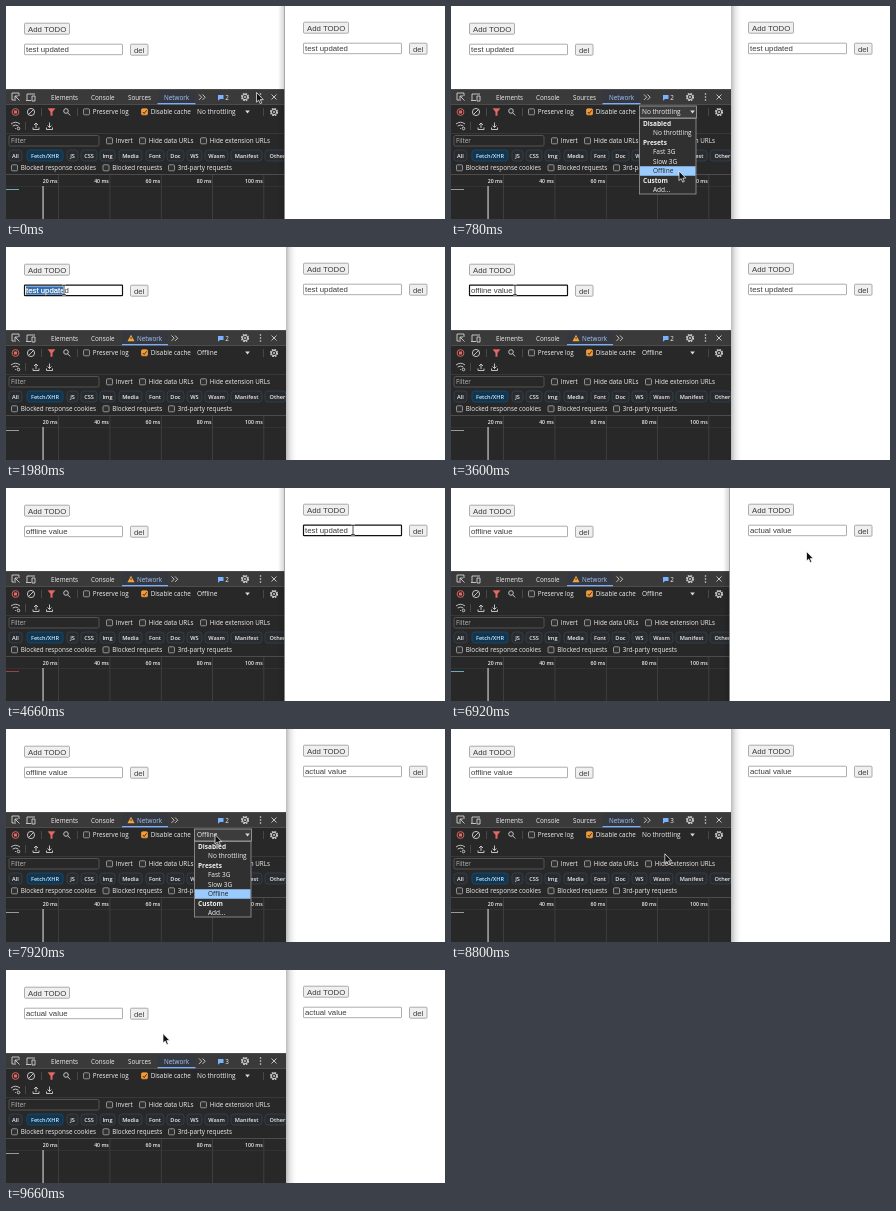
Write an HTML page that moves like this. It is 439 by 213 pixels and loops after 9.68 s.

```html
<!DOCTYPE html>
<html lang="en">
<head>
<meta charset="utf-8">
<title>Offline todo sync</title>
<style>
  html, body { margin: 0; width: 100%; height: 100%; overflow: hidden; background: #fff; }
  svg { display: block; width: 100vw; height: 100vh; }
  text { white-space: pre; }
  .page { font: 7.8px "Liberation Sans", Arial, sans-serif; fill: #3c3c3c; }
  .tools { font: 6.3px "Open Sans", "Noto Sans", sans-serif; fill: #f0f0f0; }
  .bold { font-weight: 700; }
  .chip { font-size: 5.6px; font-weight: 600; }
  .scale { font-size: 5.2px; font-weight: 600; text-anchor: end; }
</style>
</head>
<body>
<svg id="stage" viewBox="0 0 439 213">
  <defs>
    <linearGradient id="shadeRight"><stop stop-color="#bbb"/><stop offset=".3" stop-color="#e2e2e2"/><stop offset="1" stop-color="#fff" stop-opacity="0"/></linearGradient>
    <linearGradient id="shadeLeft"><stop stop-color="#000" stop-opacity="0"/><stop offset="1" stop-color="#000" stop-opacity=".16"/></linearGradient>
  </defs>
</svg>
<script>
const LOOP = 9680;
const stage = document.getElementById('stage');

function add(parent, tag, attrs = {}, content) {
  const node = document.createElementNS('http://www.w3.org/2000/svg', tag);
  for (const key in attrs) node.setAttribute(key, attrs[key]);
  if (content !== undefined) node.textContent = content;
  parent.append(node);
  return node;
}
const set = (node, attrs) => { for (const key in attrs) node.setAttribute(key, attrs[key]); };
const show = (node, on) => set(node, { visibility: on ? 'visible' : 'hidden' });
const group = (parent, cls = '') => add(parent, 'g', { class: cls });
const rect = (parent, x, y, width, height, fill, more) =>
  add(parent, 'rect', { x, y, width, height, fill, ...more });
const label = (parent, x, y, content, more) => add(parent, 'text', { x, y, ...more }, content);
const LINE = { fill: 'none', stroke: '#d2d2d2', 'stroke-width': .9 };
const path = (parent, d, more) => add(parent, 'path', { d, ...LINE, ...more });
const ring = (parent, cx, cy, r, more) => add(parent, 'circle', { cx, cy, r, ...LINE, ...more });

// Todo pages
const BORDER = { stroke: '#999', 'stroke-width': .8 };
function button(parent, x, y, width, content) {
  rect(parent, x + .5, y + .5, width - 1, 11, '#efefef', { rx: 1, ...BORDER });
  label(parent, x + 4, y + 8.8, content);
}

function todoPage(x, y, id) {
  const g = group(stage, 'page');
  button(g, x, y, 46, 'Add TODO');
  button(g, x + 106, y + 21, 18.5, 'del');
  const box = rect(g, x + .5, y + 21.5, 98, 10.5, '#fff', { rx: .6 });
  const mark = rect(g, x + 2, y + 22.7, 0, 8.3, '#2f70b8');
  const text = label(g, x + 2, y + 29.5, '');
  const clip = rect(add(g, 'clipPath', { id }), 0, y + 21, 0, 12);
  const marked = label(g, x + 2, y + 29.5, '', { fill: '#fff', stroke: '#fff', 'stroke-width': .25, 'clip-path': `url(#${id})` });
  const caret = rect(g, 0, y + 23, .7, 8, '#111');
  return {
    contains: (px, py) => px >= x && px < x + 99 && py > y + 20 && py < y + 33,
    update({ value, focused, from = 0, to = 0, blink }) {
      text.textContent = marked.textContent = value;
      set(box, focused ? { stroke: '#101010', 'stroke-width': 1.2 } : BORDER);
      set(mark, { x: from, width: to - from });
      set(clip, { x: from, width: to - from });
      show(caret, focused && from === to && blink);
      set(caret, { x: x + 2.3 + (value ? text.getComputedTextLength() : 0) });
    }
  };
}
const left = todoPage(18, 16.7, 'leftMarked');
const right = todoPage(297, 15.7, 'rightMarked');

// Developer tools
const tools = group(stage, 'tools');
rect(tools, 0, 83, 280, 130, '#282828');
rect(tools, 0, 83, 280, 15, '#3a3a3a');
const rule = (x, y, width, height, fill = '#555') => rect(tools, x, y, width, height, fill);
rule(0, 83, 280, .7);
rule(0, 98, 280, .8);
rule(0, 127, 280, .6, '#444');
rule(0, 168, 280, .8);

function gear(x, y) {
  ring(tools, x, y, 3.4, { 'stroke-width': 1.3, 'stroke-dasharray': '1.7 .97' });
  ring(tools, x, y, 2.7);
  ring(tools, x, y, .8);
}
function check(x, y, content, on) {
  rect(tools, x + .5, y - 3.2, 6, 6, on ? '#f29b38' : '#303030', { rx: 1, stroke: on ? '#f29b38' : '#aaa', 'stroke-width': .8 });
  if (on) path(tools, `M${x + 1.8} ${y}l1.4 1.5 2.4-3.2`, { stroke: '#222' });
  label(tools, x + 9.7, y + 2.2, content);
}
function activeTab(parent, x, width, textX) {
  rect(parent, x, 84, width, 14, '#35393f');
  label(parent, textX, 93.8, 'Network', { fill: '#a8c7fa' });
  rect(parent, x, 97, width, 1.3, '#7cacf8');
}
const more = (parent, x) => path(parent, `M${x} 88.5l2.7 2.7-2.7 2.7M${x + 3.5} 88.5l2.7 2.7-2.7 2.7`);

path(tools, 'M10 94H6V87h7v3M9 90l4.5 4.5M9 93v-3h3');
path(tools, 'M21 94v-6h8M20 94.5h5M26 90h3v5h-3z');
label(tools, 45, 93.8, 'Elements');
label(tools, 85, 93.8, 'Console');
const onlineTabs = group(tools), offlineTabs = group(tools);
label(onlineTabs, 122, 93.8, 'Sources');
activeTab(onlineTabs, 151.5, 38, 158);
more(onlineTabs, 193);
activeTab(offlineTabs, 116, 46, 131);
path(offlineTabs, 'M125 87.8l3.5 6.5h-7z', { fill: '#f6a63a', stroke: 'none' });
rect(offlineTabs, 124.6, 90, .9, 2.2, '#333');
more(offlineTabs, 165.5);
path(tools, 'M212 89h5.5v4h-3.5l-2 1.8z', { fill: '#79b3ff', stroke: 'none' });
const badge = label(tools, 219.3, 93.8, '2');
gear(239, 91);
for (const y of [88, 91, 94]) ring(tools, 254.5, y, .8, { fill: '#ddd', stroke: 'none' });
path(tools, 'M265.5 88.5l5 5m0-5l-5 5');

ring(tools, 9.5, 106, 3.4, { stroke: '#e46962' });
rect(tools, 8, 104.5, 3, 3, '#e46962');
ring(tools, 25, 106, 3.6);
path(tools, 'M22.5 108.5l5-5');
path(tools, 'M42 102.5h7l-2.7 3.5v3.5h-1.6V106z', { fill: '#e46962', stroke: '#e46962', 'stroke-width': .4 });
ring(tools, 60, 105, 2.3);
path(tools, 'M61.7 106.8l2.5 2.6');
for (const x of [35, 71, 257]) rule(x, 102, .7, 8);
check(77, 106, 'Preserve log');
check(135, 106, 'Disable cache', true);
const selectBox = rect(tools, 188.5, 100, 57, 12, '#3c3c3c', { stroke: '#aaa', 'stroke-width': .8 });
const choice = label(tools, 191, 108.2, '', { 'font-size': 6.5 });
path(tools, 'M239.2 104.5h4.6l-2.3 3z', { fill: '#ddd', stroke: 'none' });
gear(268, 106);

path(tools, 'M5 118q4.5-3.5 9 0M6.7 120q2.8-2 5.6 0M9.5 122v.8');
ring(tools, 12.5, 122.5, 1.3);
rule(19, 116, .7, 8);
path(tools, 'M30 122v-5m-2 2l2-2 2 2M27 121.5v2h6v-2');
path(tools, 'M43.5 116.5v5m-2-2l2 2 2-2M40.5 121.5v2h6v-2');

rect(tools, 3, 129.5, 90, 10.5, '#282828', { rx: 1.5, stroke: '#666', 'stroke-width': .7 });
label(tools, 5, 137.2, 'Filter', { fill: '#bbb' });
check(100, 135, 'Invert');
check(133, 135, 'Hide data URLs');
check(194, 135, 'Hide extension URLs');

const chips = [['All', 3, 13], ['Fetch/XHR', 21, 36], ['JS', 61, 11], ['CSS', 75, 16], ['Img', 94, 15], ['Media', 113, 23],
  ['Font', 140, 18], ['Doc', 161, 17], ['WS', 181, 15], ['Wasm', 199, 23], ['Manifest', 225, 31], ['Other', 259, 25]];
chips.forEach(([name, x, width], i) => {
  const on = i === 1, visible = Math.min(width, 280 - x);
  rect(tools, x, 144, visible, 11, on ? '#123650' : '#292b2e', { rx: 3, stroke: on ? '#155078' : '#33485a', 'stroke-width': .7 });
  label(tools, x + width / 2, 151.5, name, { class: 'chip', 'text-anchor': 'middle', fill: on ? '#c2e7ff' : '#f0f0f0' });
});
check(5, 162, 'Blocked response cookies');
check(96.5, 162, 'Blocked requests');
check(162, 162, '3rd-party requests');

for (let i = 1; i <= 5; i++) {
  const x = 1 + i * 51.3;
  rule(x, 169, .7, 44, '#484848');
  label(tools, x - .7, 177, `${i * 20} ms`, { class: 'scale' });
}
rule(0, 180, 280, .5, '#3d3d3d');
rule(36.5, 180, 1.1, 33, '#d8d8d8');
const request = rule(0, 183, 13, 1, '#777');

// Throttling menu
const menu = group(stage, 'tools');
rect(menu, 188.5, 112.5, 56.5, 75.5, '#303030', { stroke: '#999', 'stroke-width': .8 });
const highlight = rect(menu, 189, 0, 55.5, 9.5, '#9acbff');
const ROW = 9.45, MENU_TOP = 113;
const rows = ['Disabled', 'No throttling', 'Presets', 'Fast 3G', 'Slow 3G', 'Offline', 'Custom', 'Add...'].map((name, i) => {
  const heading = [0, 2, 6].includes(i);
  const node = label(menu, heading ? 192 : 202, MENU_TOP + 7 + i * ROW, name, { class: heading ? 'bold' : '', 'font-size': 6.5 });
  return { node, heading };
});

// Window edge and pointer
rect(stage, 280, 83, 12, 130, '#fff');
const edgeRight = rect(stage, 280, 0, 12, 213, 'url(#shadeRight)');
const edgeLeft = group(stage);
rect(edgeLeft, 272, 0, 6, 213, 'url(#shadeLeft)');
rect(edgeLeft, 278, 0, .8, 213, '#777');
rect(edgeLeft, 278.8, 0, 2, 213, '#fff');
const arrow = path(stage, 'M0 0v9.6l2.2-2 1.5 3.5 1.6-.7-1.5-3.3h3z', { fill: '#111', stroke: '#fff', 'stroke-width': .7 });
const beam = group(stage);
const beamShape = 'M-1.8-4.5h3.6M0-4.5v9M-1.8 4.5h3.6';
path(beam, beamShape, { stroke: '#fff', 'stroke-width': 1.8 });
path(beam, beamShape, { stroke: '#222', 'stroke-width': .8 });

const route = [
  [60, 250.5, 86.5], [300, 226, 104], [480, 226, 104], [760, 228, 165], [1060, 228, 165],
  [1500, 20, 43], [1600, 20, 43], [1980, 58, 43], [2130, 64, 43], [3600, 64, 43],
  [4300, 347, 42], [4720, 347, 42], [5050, 296, 42], [6080, 296, 42], [6420, 355.5, 63.5],
  [6980, 355.5, 63.5], [7560, 209, 105.5], [7940, 209, 105.5], [8160, 214, 125], [8780, 214, 125],
  [9450, 157, 63.5], [LOOP, 157, 63.5]
];
function pointerAt(t) {
  const i = route.findIndex(stop => stop[0] > t);
  if (i <= 0) return route[0].slice(1);
  const [t0, x0, y0] = route[i - 1], [t1, x1, y1] = route[i];
  const p = (t - t0) / (t1 - t0), ease = p * p * (3 - 2 * p);
  return [x0 + (x1 - x0) * ease, y0 + (y1 - y0) * ease];
}

const within = (t, start, end) => t >= start && t < end;
function typed(t, before, after, start, end) {
  if (t < start) return before;
  return after.slice(0, 1 + Math.floor((t - start) / (end - start) * (after.length - 1)));
}

function render(t) {
  const [x, y] = pointerAt(t);
  const offline = within(t, 1020, 8740);
  const leftActive = within(t, 400, 4400) || t >= 7600;
  const editingRight = within(t, 4400, 6520);
  const blink = t % 1000 < 500;

  left.update({
    value: t >= 8900 ? 'actual value' : typed(t, 'test updated', 'offline value', 2300, 3500),
    focused: within(t, 1560, 3800), blink,
    ...(within(t, 1600, 2300) && { from: 20, to: Math.min(x, 63) })
  });
  right.update({
    value: typed(t, 'test updated', 'actual value', 5250, 6050),
    focused: editingRight, blink,
    ...(within(t, 4720, 5250) && { from: Math.min(Math.max(x, 299), 342), to: 342 })
  });

  show(onlineTabs, !offline);
  show(offlineTabs, offline);
  badge.textContent = t >= 8740 ? '3' : '2';
  choice.textContent = offline ? 'Offline' : 'No throttling';
  set(request, { fill: editingRight ? '#96443f' : leftActive ? '#999' : '#6fa9bd' });

  const open = within(t, 400, 1020) || within(t, 7700, 8740);
  show(menu, open);
  show(selectBox, open);
  const hovered = Math.floor((y - MENU_TOP) / ROW);
  const active = rows[hovered] && !rows[hovered].heading ? hovered : offline ? 5 : 1;
  set(highlight, { y: MENU_TOP + active * ROW });
  rows.forEach(({ node }, i) => set(node, { fill: i === active ? '#222' : '#f0f0f0' }));

  show(edgeRight, leftActive);
  show(edgeLeft, !leftActive);
  const overText = left.contains(x, y) || right.contains(x, y);
  show(arrow, !overText);
  show(beam, overText);
  set(overText ? beam : arrow, { transform: `translate(${x} ${y})` });
}

function tick(now) {
  render(now % LOOP);
  requestAnimationFrame(tick);
}
render(0);
requestAnimationFrame(tick);
</script>
</body>
</html>
```
